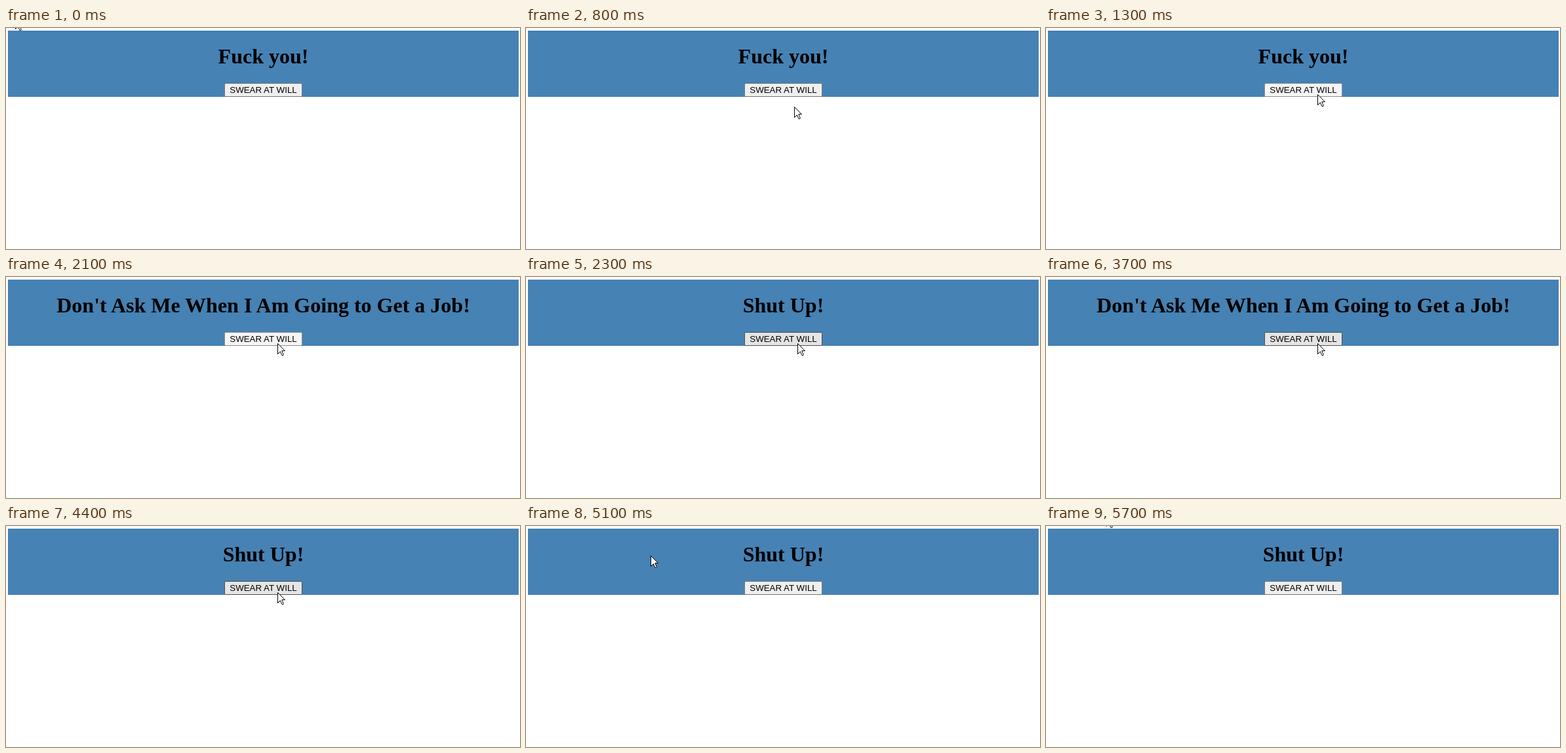
An HTML page that plays this animation: 784 by 337 pixels, repeating every 6 s.

```html
<!DOCTYPE html>
<html lang="en">
<head>
<meta charset="utf-8">
<title>Swear at will</title>
<style>
html, body { margin: 0; width: 100%; height: 100%; overflow: hidden; background: #fff; }
.stage { position: relative; width: 784px; height: 337px; overflow: hidden; }
.panel { position: absolute; left: 3px; top: 4px; width: 779px; height: 101px; background: #4682b4; }

h1 {
  position: absolute; left: 0; top: 21px; width: 100%; margin: 0;
  font: bold 32px/36px "Liberation Serif", "Times New Roman", serif;
  text-align: center; white-space: nowrap; color: #000; visibility: hidden;
}
.button {
  position: absolute; left: 330px; top: 80px; width: 119px; height: 21px;
  box-sizing: border-box; border: 1px solid #767676; border-radius: 2px;
  background: #efefef; color: #000; text-align: center; white-space: nowrap;
  font: 13.333px/15px "Liberation Sans", Arial, sans-serif; padding-top: 2px;
}
.cursor { position: absolute; left: 0; top: 0; width: 12px; height: 19px; overflow: visible; }

/* Everything jumps between poses on one shared six-second clock. */
h1, .button, .cursor { animation: 6s step-end infinite; }
.first { animation-name: first; }
.second { animation-name: second; }
.third { animation-name: third; }
.button { animation-name: press; }
.cursor { animation-name: move; }

@keyframes first {
  0%, 50% { visibility: visible; }
  23.33%, 61.66%, 100% { visibility: hidden; }
}
@keyframes second {
  0%, 38.33%, 73.33%, 100% { visibility: hidden; }
  23.33%, 61.66% { visibility: visible; }
}
@keyframes third {
  0%, 50% { visibility: hidden; }
  38.33%, 73.33%, 100% { visibility: visible; }
}
/* idle, hovered, pressed */
@keyframes press {
  0%, 83.33%, 100% { background: #efefef; border-color: #767676; }
  16.66%, 23.33%, 38.33%, 50% { background: #e5e5e5; border-color: #4f4f4f; }
  21.66%, 35%, 48.33% { background: #f5f5f5; border-color: #8d8d8d; }
}
@keyframes move {
  0% { transform: translate(14px, -15px); }
  5% { transform: translate(210px, 65px); }
  6.66% { transform: translate(401px, 142px); }
  11.66% { transform: translate(404px, 134px); }
  13.33% { transform: translate(409px, 120px); }
  15% { transform: translate(413px, 106px); }
  16.66% { transform: translate(414px, 101px); }
  83.33% { transform: translate(326px, 82px); }
  85% { transform: translate(190px, 45px); }
  86.66% { transform: translate(75px, 8px); }
  88.33% { transform: translate(95px, -7px); }
  91.66% { transform: translate(94px, -10px); }
  93.33% { transform: translate(93px, -13px); }
  95%, 100% { transform: translate(92px, -16px); }
}
</style>
</head>
<body>
<div class="stage">
  <div class="panel">
    <h1 class="first">Fuck you!</h1>
    <h1 class="second">Don't Ask Me When I Am Going to Get a Job!</h1>
    <h1 class="third">Shut Up!</h1>
    <div class="button">SWEAR AT WILL</div>
  </div>
  <svg class="cursor" viewBox="0 0 12 19">
    <path d="M.5 .5V16.5L4.3 12.7L7 18.5H8.8L9.3 17.5L6.8 11.6H11.4Z" fill="#fff" stroke="#000"/>
  </svg>
</div>
</body>
</html>
```
